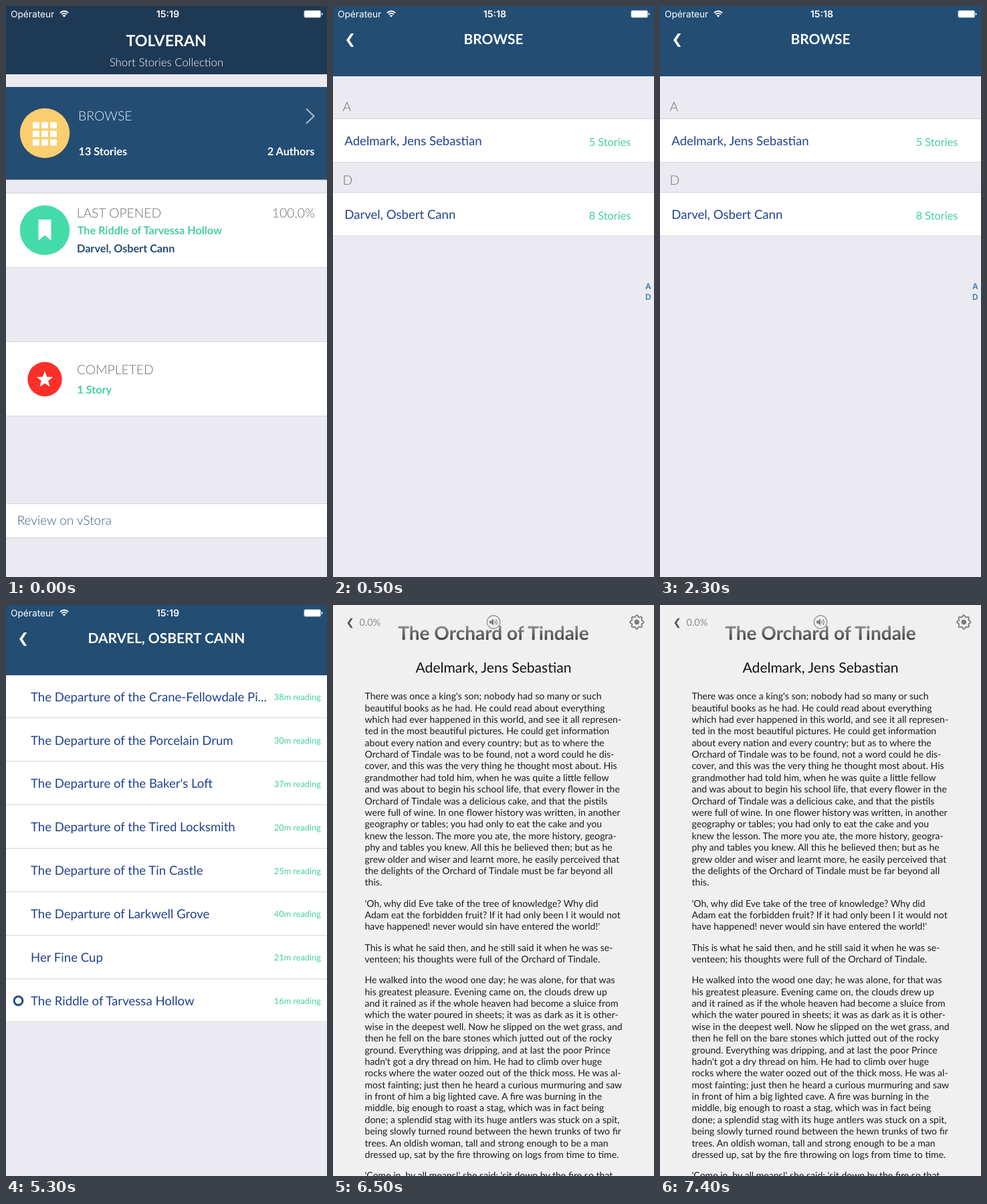
These frames come from a looping animation (480 px wide and 853 px high, 8000 ms). An HTML page:

```html
<!DOCTYPE html>
<html lang="en">
<head>
<meta charset="utf-8">
<title>Story reader</title>
<style>
  html, body { margin: 0; width: 100%; height: 100%; overflow: hidden; background: #ebeaf0; }
  svg { display: block; width: 100vw; height: 100vh; }
  text { font-family: Lato, Carlito, sans-serif; text-rendering: geometricPrecision; white-space: pre; }
  .ui { font-family: Inter, Roboto, sans-serif; }
</style>
</head>
<body>
<svg id="stage" viewBox="0 0 480 853" preserveAspectRatio="none"></svg>
<script>
const C = {
  page: '#ebeaf0', navy: '#1e3954', blue: '#234d73', ink: '#1f4190', green: '#43cfa2',
  grey: '#6c6c6c', line: '#d6d5da', white: '#fff'
};
const AUTHOR_A = 'Adelmark, Jens Sebastian';
const AUTHOR_D = 'Darvel, Osbert Cann';
const LAST_TITLE = 'The Riddle of Tarvessa Hollow';

const rect = (x, y, w, h, fill, rx = 0) =>
  `<rect x="${x}" y="${y}" width="${w}" height="${h}" rx="${rx}" fill="${fill}"/>`;
const disc = (x, y, r, fill) => `<circle cx="${x}" cy="${y}" r="${r}" fill="${fill}"/>`;
const ring = (x, y, r, stroke, w) =>
  `<circle cx="${x}" cy="${y}" r="${r}" fill="none" stroke="${stroke}" stroke-width="${w}"/>`;
const shape = (d, fill) => `<path d="${d}" fill="${fill}"/>`;
const stroke = (d, color, w, cap = 'butt') =>
  `<path d="${d}" fill="none" stroke="${color}" stroke-width="${w}" stroke-linecap="${cap}"/>`;
const text = (s, x, y, size, fill, { weight = 400, anchor = 'start', cls = '' } = {}) =>
  `<text class="${cls}" x="${x}" y="${y}" font-size="${size}" font-weight="${weight}" ` +
  `text-anchor="${anchor}" fill="${fill}">${s}</text>`;

const light = { weight: 300 }, bold = { weight: 700 };
const end = { anchor: 'end' }, mid = { anchor: 'middle' };

function polar(cx, cy, count, radius) {
  return 'M' + Array.from({ length: count }, (_, i) => {
    const a = i / count * Math.PI * 2 - Math.PI / 2, r = radius(i);
    return `${(cx + r * Math.cos(a)).toFixed(2)} ${(cy + r * Math.sin(a)).toFixed(2)}`;
  }).join('L') + 'Z';
}

const panel = (y, h) =>
  rect(0, y - 1, 480, h + 2, C.line) + rect(0, y, 480, h, C.white);

const statusBar = time =>
  text('Opérateur', 7, 17, 13.7, C.white, { cls: 'ui' }) +
  stroke('M80.8 10.3Q87 4.6 93.2 10.3M83.1 12.6Q87 9.1 90.9 12.6', C.white, 1.8) +
  shape('M84.6 14.2Q87 12.2 89.4 14.2L87 16.7Z', C.white) +
  text(time, 242, 17, 14.2, C.white, { weight: 600, anchor: 'middle', cls: 'ui' }) +
  rect(445.3, 6.3, 25.8, 11.4, 'rgba(255,255,255,.5)', 2.6) +
  rect(446.2, 7.2, 24, 9.6, C.white, 1.8) +
  shape('M471.8 10Q473.6 10.4 473.6 12T471.8 14Z', C.white);

const backArrow = (x, y, h, fill) => shape(
  `M${x + h * 0.34} ${y - h / 2}H${x + h * 0.56}L${x + h * 0.23} ${y}` +
  `L${x + h * 0.56} ${y + h / 2}H${x + h * 0.34}L${x} ${y}Z`, fill);

const navBar = (title, time) =>
  rect(0, 0, 480, 105, C.blue) + statusBar(time) +
  backArrow(20, 51, 20, C.white) +
  text(title, 240, 56.5, 20.9, C.white, { ...bold, ...mid });

function home() {
  let grid = '';
  for (let i = 0; i < 9; i++)
    grid += rect(40 + i % 3 * 13, 173.4 + Math.floor(i / 3) * 12.9, 9.8, 9.4, C.white);
  return rect(0, 0, 480, 853, C.page) +
    rect(0, 0, 480, 102, C.navy) + statusBar('15:19') +
    text('TOLVERAN', 239.7, 60, 23.2, C.white, { ...bold, ...mid }) +
    text('Short Stories Collection', 240, 90.2, 16.8, C.white, { ...light, ...mid }) +

    rect(0, 121, 480, 138.5, C.blue) +
    disc(58, 190, 37.2, '#fbce6f') + grid +
    text('BROWSE', 108, 171.3, 19.4, '#eef2f6', light) +
    text('13 Stories', 108.5, 223, 16.23, C.white, bold) +
    text('2 Authors', 461.5, 223, 16.23, C.white, { ...bold, ...end }) +
    stroke('M449 153.5L460.5 164.5L449 175.5', '#b9c3ce', 1.8) +

    panel(280, 110) +
    disc(58, 335, 37.2, '#44dbab') +
    shape('M48.5 319H67.5V350.5L58 342.5L48.5 350.5Z', C.white) +
    text('LAST OPENED', 105.7, 316.3, 19.3, C.grey, light) +
    text('100.0%', 462, 316.3, 19.3, C.grey, { ...light, ...end }) +
    text(LAST_TITLE, 106.7, 341, 16.23, C.green, bold) +
    text(AUTHOR_D, 106, 368, 16.23, C.blue, bold) +

    panel(502, 110) +
    disc(58, 557.5, 25.7, '#fd2f29') +
    shape(polar(58, 558.3, 10, i => i % 2 ? 5.4 : 12.8), C.white) +
    text('COMPLETED', 106, 550.3, 19.3, C.grey, light) +
    text('1 Story', 106.3, 579, 16.23, C.green, bold) +

    panel(744, 49.5) +
    text('Review on vStora', 16.7, 775.3, 19, '#2f5a84', light);
}

function browse() {
  const section = (letter, y, author, count) =>
    text(letter, 14.6, y - 12, 19.3, C.grey, light) +
    panel(y, 64) +
    text(author, 17.3, y + 39.3, 18.6, C.ink) +
    text(count + ' Stories', 445.3, y + 39.7, 16.3, C.green, end);
  const index = { weight: 600, anchor: 'middle', cls: 'ui' };
  return rect(0, 0, 480, 853, C.page) + navBar('BROWSE', '15:18') +
    section('A', 169, AUTHOR_A, 5) +
    section('D', 279, AUTHOR_D, 8) +
    text('A', 471.3, 423, 12, '#3d78b4', index) +
    text('D', 471.3, 438.7, 12, '#3d78b4', index);
}

function stories() {
  const step = 64.93;
  const prefix = 'The Departure of ';
  const rows = [
    [prefix + 'the Crane-Fellowdale Pi...', 38],
    [prefix + 'the Porcelain Drum', 30],
    [prefix + "the Baker's Loft", 37],
    [prefix + 'the Tired Locksmith', 20],
    [prefix + 'the Tin Castle', 25],
    [prefix + 'Larkwell Grove', 40],
    ['Her Fine Cup', 21],
    [LAST_TITLE, 16]
  ];
  return rect(0, 0, 480, 853, C.page) +
    rect(0, 104, 480, step * 8, C.white) +
    navBar(AUTHOR_D.toUpperCase(), '15:19') +
    rows.map(([title, minutes], i) => {
      const y = 104 + i * step;
      return rect(0, Math.round(y + step - 1), 480, 1, C.line) +
        text(title, 37, y + 39.6, 18.6, C.ink) +
        text(minutes + 'm reading', 470.8, y + 37.8, 12.75, C.green, end);
    }).join('') +
    disc(18.5, 591.2, 9.2, '#dbe5f0') + disc(18.5, 591.2, 5.5, C.white) +
    ring(18.5, 591.2, 6.3, '#234680', 2.8);
}

const STORY = `There was once a king's son; nobody had so many or such
beautiful books as he had. He could read about everything
which had ever happened in this world, and see it all represen-
ted in the most beautiful pictures. He could get information
about every nation and every country; but as to where the
Orchard of Tindale was to be found, not a word could he dis-
cover, and this was the very thing he thought most about. His
grandmother had told him, when he was quite a little fellow
and was about to begin his school life, that every flower in the
Orchard of Tindale was a delicious cake, and that the pistils
were full of wine. In one flower history was written, in another
geography or tables; you had only to eat the cake and you
knew the lesson. The more you ate, the more history, geogra-
phy and tables you knew. All this he believed then; but as he
grew older and wiser and learnt more, he easily perceived that
the delights of the Orchard of Tindale must be far beyond all
this.

'Oh, why did Eve take of the tree of knowledge? Why did
Adam eat the forbidden fruit? If it had only been I it would not
have happened! never would sin have entered the world!'

This is what he said then, and he still said it when he was se-
venteen; his thoughts were full of the Orchard of Tindale.

He walked into the wood one day; he was alone, for that was
his greatest pleasure. Evening came on, the clouds drew up
and it rained as if the whole heaven had become a sluice from
which the water poured in sheets; it was as dark as it is other-
wise in the deepest well. Now he slipped on the wet grass, and
then he fell on the bare stones which jutted out of the rocky
ground. Everything was dripping, and at last the poor Prince
hadn't got a dry thread on him. He had to climb over huge
rocks where the water oozed out of the thick moss. He was al-
most fainting; just then he heard a curious murmuring and saw
in front of him a big lighted cave. A fire was burning in the
middle, big enough to roast a stag, which was in fact being
done; a splendid stag with its huge antlers was stuck on a spit,
being slowly turned round between the hewn trunks of two fir
trees. An oldish woman, tall and strong enough to be a man
dressed up, sat by the fire throwing on logs from time to time.

'Come in, by all means!' she said; 'sit down by the fire so that`;

function reader() {
  let y = 141.2, body = '';
  for (const line of STORY.split('\n')) {
    if (line) body += text(line, 47.5, y.toFixed(2), 14.08, '#1c1c1c');
    y += line ? 17.38 : 13.9;
  }
  const gear = polar(454.3, 25.5, 64, i => 9 + 1.1 * Math.tanh(3 * Math.cos(i / 64 * Math.PI * 16)));
  return `<defs><linearGradient id="fade" gradientUnits="userSpaceOnUse" x1="0" y1="30" x2="0" y2="54">
      <stop offset="0" stop-color="#969696"/><stop offset="1" stop-color="#3c3c3c"/>
    </linearGradient></defs>` +
    rect(0, 0, 480, 853, '#f0f0f0') +
    text('The Orchard of Tindale', 240, 51.5, 28, 'url(#fade)', { ...bold, ...mid }) +
    text(AUTHOR_A, 240, 101.3, 21.1, '#111', mid) + body +
    backArrow(21.5, 27, 14.5, '#555') +
    text('0.0%', 39.5, 31, 14.5, '#8c8c8c') +
    disc(240, 25.5, 9.8, 'rgba(240,240,240,.7)') + ring(240, 25.5, 9.8, '#858585', 1.2) +
    shape('M234 23.5H236.5L240 20.5V30.5L236.5 27.5H234Z', '#7c7c7c') +
    stroke('M241.8 23.3Q243.4 25.5 241.8 27.7M243.8 21.6Q246.8 25.5 243.8 29.4', '#7c7c7c', 1.1, 'round') +
    stroke(gear, '#7c7c7c', 1.8) + disc(454.3, 25.5, 3.7, '#7c7c7c');
}

const LOOP = 8000;
const screens = [
  [home, 0, 500],
  [browse, 500, 3500],
  [stories, 3500, 6500],
  [reader, 6500, LOOP]
];

const stage = document.getElementById('stage');
stage.innerHTML = screens.map(([draw]) => `<g>${draw()}</g>`).join('');
const groups = [...stage.children];

function tick() {
  const t = performance.now() % LOOP;
  screens.forEach(([, from, to], i) => {
    groups[i].style.display = t >= from && t < to ? '' : 'none';
  });
  requestAnimationFrame(tick);
}
tick();
</script>
</body>
</html>
```
